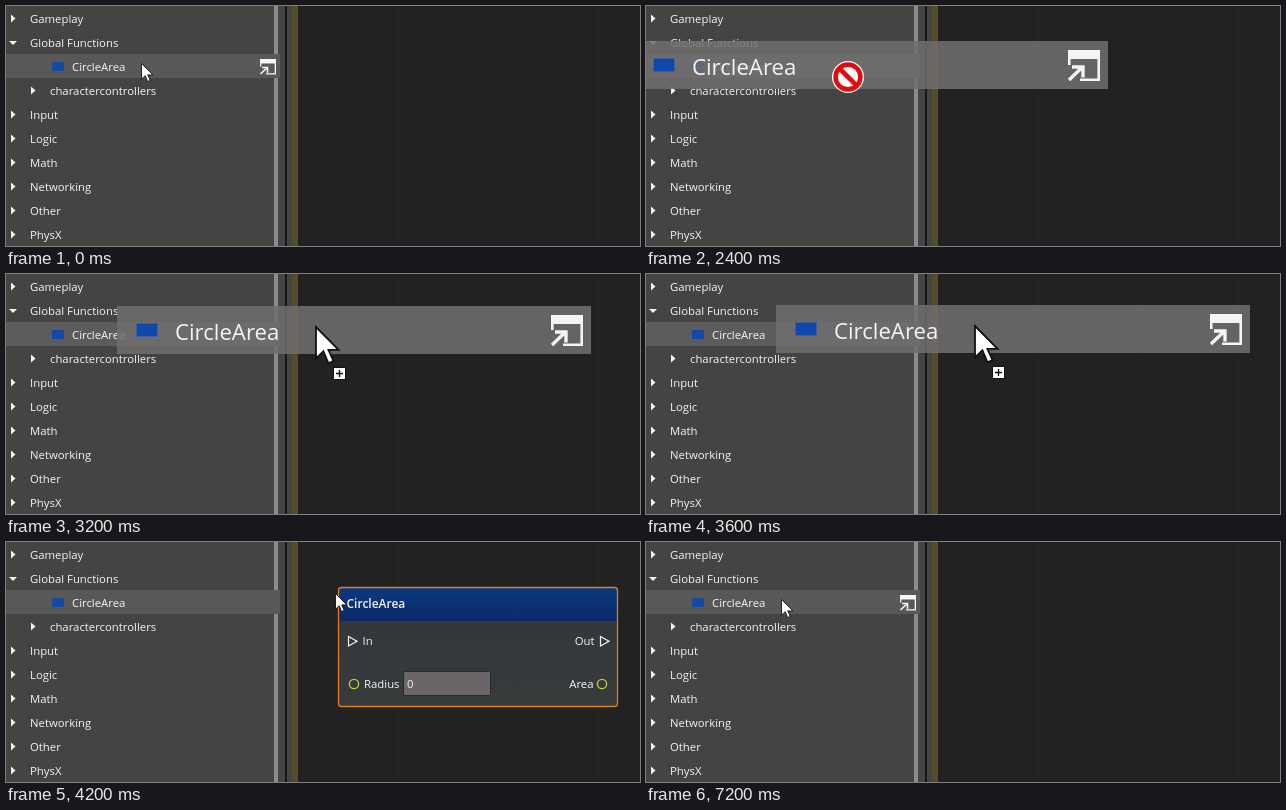
Recreate the animation shown at these times as an HTML page. Size 634 by 240 pixels, loop 7.4 s.

```html
<!DOCTYPE html>
<html lang="en">
<head>
<meta charset="utf-8">
<title>Drag a function onto the graph</title>
<style>
html, body { margin: 0; width: 100%; height: 100%; overflow: hidden; background: #222223; }
svg { display: block; }
text { font: 11.35px "Open Sans", "Noto Sans", sans-serif; fill: #f4f4f4; }
.big { font-size: 22.2px; }
.title { font-size: 12px; font-weight: 600; }
.end { text-anchor: end; }
.line { fill: none; stroke: #f4f4f4; stroke-width: 1.2; }
.port { fill: none; stroke: #c6c83c; stroke-width: 1.4; }
</style>
</head>
<body>
<svg width="634" height="240" viewBox="0 0 634 240">
  <defs>
    <linearGradient id="header" x2="0" y2="1">
      <stop stop-color="#0b3a80"/><stop offset="1" stop-color="#0a2a68"/>
    </linearGradient>
    <linearGradient id="body" x2="0" y2="1">
      <stop stop-color="#313638"/><stop offset="1" stop-color="#383b3c"/>
    </linearGradient>
    <path id="arrow" d="M.5 .5V16.2L4.2 12.7L6.7 18.6L9.2 17.5L6.7 11.9H11.8Z" fill="#fff" stroke="#111" stroke-width=".9"/>
    <g id="open" fill="none" stroke="#f4f4f4" stroke-width="2.6">
      <path d="M0 0H32V9H0Z" fill="#f4f4f4" stroke="none"/>
      <path d="M1.3 5V15M30.7 5V29.7H12"/>
      <path d="M1 30L14 17.5M4 17H15V27.5" stroke-width="3.4"/>
    </g>
  </defs>

  <path d="M392.5 0V240M492.5 0V240M592.5 0V240" stroke="#272726"/>
  <rect width="286" height="240" fill="#444443"/>
  <rect x="268" width="4" height="240" fill="#8d898c"/>
  <rect x="279" width="2" height="240" fill="#151619"/>
  <rect x="286" width="6" height="240" fill="#544d29"/>
  <rect id="row" y="48" width="274" height="24"/>
  <rect id="chip" x="46" y="56" width="12" height="9" fill="#1349a5"/>
  <g id="tree"></g>
  <use id="hover" href="#open" transform="translate(254 53) scale(.5)"/>

  <g id="node">
    <rect x="332.5" y="45.5" width="279" height="119" rx="3" fill="url(#body)"/>
    <path d="M333 79V48.5Q333 46 335.5 46H608.5Q611 46 611 48.5V79Z" fill="url(#header)"/>
    <rect x="332.5" y="45.5" width="279" height="119" rx="3" fill="none" stroke="#e27c22" stroke-width="1.3"/>
    <text class="title" x="340.5" y="66">CircleArea</text>
    <path class="line" d="M342.5 94.5V104L351 99.2ZM594.5 94.5V104L603 99.2Z"/>
    <text x="356.5" y="103">In</text>
    <text class="end" x="588.5" y="103">Out</text>
    <circle class="port" cx="348" cy="142" r="4.6"/>
    <text x="358" y="146">Radius</text>
    <rect x="397.5" y="129.5" width="87" height="24" rx="1" fill="#696568" stroke="#29292b"/>
    <text x="401" y="146">0</text>
    <text class="end" x="587.5" y="146">Area</text>
    <circle class="port" cx="596" cy="142" r="4.6"/>
  </g>

  <g id="drag">
    <rect width="474" height="48" fill="#706e6e" opacity=".86"/>
    <rect x="19.5" y="17.5" width="21" height="13" fill="#0f48ad" stroke="#3f5f9c"/>
    <text class="big" x="58" y="34">CircleArea</text>
    <use href="#open" x="434" y="9"/>
    <g id="denied" transform="translate(214 36)">
      <circle r="16" fill="#fff"/>
      <g fill="none" stroke="#df0d10" stroke-width="4.6"><circle r="12.4"/><path d="M-9 -9L9 9"/></g>
    </g>
    <g id="copy" transform="translate(198 20)">
      <use href="#arrow" transform="scale(2)"/>
      <rect x="18.5" y="41.5" width="12" height="12" fill="#fff" stroke="#111"/>
      <path d="M24.5 44V51M21 47.5H28" stroke="#111" stroke-width="1.4"/>
    </g>
  </g>

  <use id="pointer" href="#arrow"/>
  <g id="hand" transform="translate(119 49)" fill="#fff" stroke="#111" stroke-linejoin="round">
    <path d="M7 12V4Q7 1.5 9.2 1.5T11.7 4Q11.7 .7 14 .7T16.5 4Q16.7 1.3 18.9 1.3T21.3 4.5Q21.6 2.6 23.8 2.6Q28.4 2.6 28.4 7V16Q28.4 21 24.5 24V27.5H9.5V24Q5 20 2 15.5Q.2 12.5 1.8 11Q4 9.6 7 12Z"/>
    <path d="M11.7 4V10M16.5 4V10M21.3 4.5V10M7 11V15" fill="none"/>
  </g>
</svg>
<script>
const LOOP = 7400, STEP = 200, DRAG_START = 2400, DROP = 3800;
// Left and top of the dragged row at each step.
const dragPath = [[-12, 35], [43, 36], [79, 36], [100, 34], [111, 32], [121, 31], [130, 31]];
const labels = ["Gameplay", "Global Functions", "CircleArea", "charactercontrollers",
  "Input", "Logic", "Math", "Networking", "Other", "PhysX"];
const el = id => document.getElementById(id);
const show = (id, on) => el(id).style.display = on ? "" : "none";
const place = (id, x, y) => el(id).setAttribute("transform", `translate(${x} ${y})`);

el("tree").innerHTML = labels.map((label, i) => {
  const indent = i == 2 ? 42 : i == 3 ? 20 : 0, y = 13 + 24 * i;
  const marker = i == 1 ? `M3 ${y - 2}h8l-4 4z` : i == 2 ? "" : `M${5 + indent} ${y - 4.5}v8l4.5 -4z`;
  return `<path d="${marker}" fill="#f4f4f4"/><text x="${24 + indent}" y="${y + 4}">${label}</text>`;
}).join("");

function draw(t) {
  const dragging = t >= DRAG_START && t < DROP;
  const dropped = t >= DROP && t < 7000;
  const idle = t < DRAG_START || t >= 7000;
  const grabbing = t >= 1600 && t < 1800;
  const hidden = t >= 2000 && t < 2200;

  el("row").setAttribute("fill", dragging ? "#5e5b5d" : "#595859");
  el("chip").setAttribute("rx", dragging ? 0 : 2.5);
  show("hover", t < 2000 || t >= 7000);
  show("node", dropped);
  show("drag", dragging);
  show("hand", grabbing);
  show("pointer", dropped || idle && !grabbing && !hidden);
  place("pointer", ...(dropped ? [329, 51] : [135, 57]));
  if (dragging) {
    place("drag", ...dragPath[Math.floor((t - DRAG_START) / STEP)]);
    show("denied", t < 3000);
    show("copy", t >= 3000);
  }
}

const start = performance.now();
function tick() {
  draw((performance.now() - start) % LOOP);
  requestAnimationFrame(tick);
}
tick();
</script>
</body>
</html>
```
